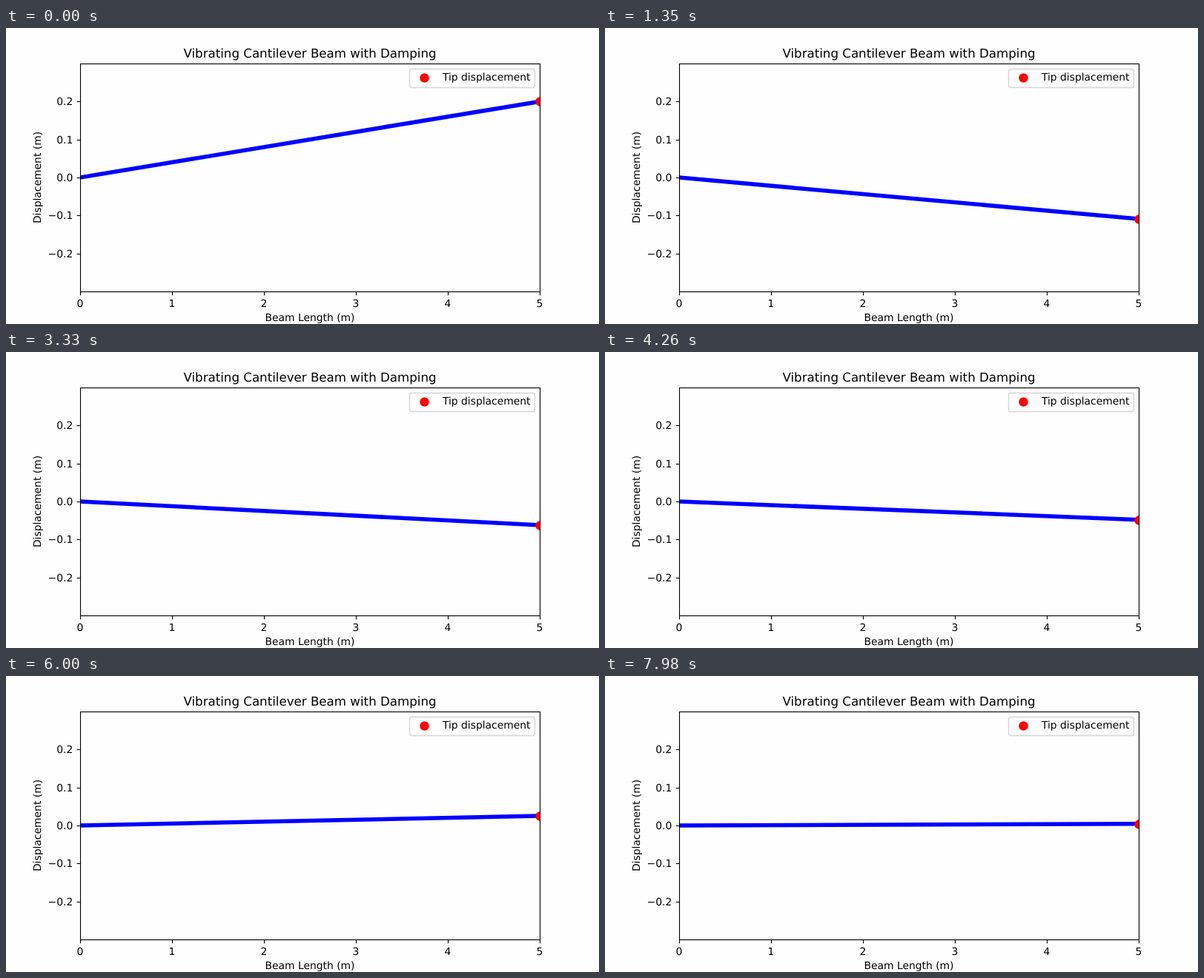
An HTML page that plays this animation: 800 by 400 pixels, repeating every 8000 ms.

```html
<!DOCTYPE html>
<html lang="en">
<head>
<meta charset="utf-8">
<title>Vibrating Cantilever Beam with Damping</title>
<style>
  html, body { margin: 0; width: 100%; height: 100%; overflow: hidden; background: #fefefe; }
  svg { display: block; width: 800px; height: 400px; }
  text {
    font: 13.889px "DejaVu Sans", sans-serif;
    text-rendering: geometricPrecision;
    text-anchor: middle;
  }
  .title { font-size: 16.667px; }
  .end { text-anchor: end; }
  .start { text-anchor: start; }
  .axis { fill: none; stroke: #000; stroke-width: 1.11; }
  .dot { fill: #f00; }
</style>
</head>
<body>
<svg viewBox="0 0 800 400">
  <clipPath id="plot"><rect x="100" y="48" width="620" height="308"/></clipPath>
  <g clip-path="url(#plot)">
    <line id="beam" x1="100" y1="202" x2="720" y2="99.33" stroke="#00f" stroke-width="5.556" stroke-linecap="square"/>
    <circle id="tip" class="dot" cx="720.5" cy="99.5" r="6.25"/>
  </g>
  <rect class="axis" x="100.5" y="48.5" width="620" height="308"/>
  <g id="ticks"></g>
  <text class="title" x="410" y="40">Vibrating Cantilever Beam with Damping</text>
  <text x="410" y="396">Beam Length (m)</text>
  <text transform="translate(47 202) rotate(-90)">Displacement (m)</text>
  <rect x="544.5" y="55.5" width="169" height="25" rx="2.78" fill="#fefefe" stroke="#ccc" stroke-opacity=".8" stroke-width="1.39"/>
  <circle class="dot" cx="564.5" cy="67.5" r="6.25"/>
  <text class="start" x="588.9" y="71">Tip displacement</text>
</svg>
<script>
  const LOOP = 8000, STEP = 30;
  const ZERO_Y = 202, SCALE = 308 / 0.6;
  const AMPLITUDE = 0.2, DECAY = 0.01, CYCLES = 0.3203; // decay and cycles per step

  const beam = document.getElementById('beam');
  const tip = document.getElementById('tip');
  const ticks = document.getElementById('ticks');

  const toY = value => ZERO_Y - value * SCALE;

  function add(name, attributes, content = '') {
    const node = document.createElementNS('http://www.w3.org/2000/svg', name);
    for (const key in attributes) node.setAttribute(key, attributes[key]);
    node.textContent = content;
    ticks.append(node);
  }

  for (let i = 0; i <= 5; i++) {
    const x = 100 + 124 * i;
    add('path', { class: 'axis', d: `M${x + 0.5} 356.5v4.86` });
    add('text', { x, y: 377 }, i);
  }
  for (let i = -2; i <= 2; i++) {
    const y = Math.round(toY(i / 10));
    add('path', { class: 'axis', d: `M100.5 ${y + 0.5}h-4.86` });
    add('text', { class: 'end', x: 90.3, y: y + 5 }, (i / 10).toFixed(1).replace('-', '\u2212'));
  }

  const start = performance.now();

  function draw() {
    const time = (performance.now() - start) % LOOP;
    const n = Math.floor(time / STEP);
    const y = toY(AMPLITUDE * Math.exp(-DECAY * n) * Math.cos(2 * Math.PI * CYCLES * n));
    beam.setAttribute('y2', y);
    tip.setAttribute('cy', Math.round(y) + 0.5);
    requestAnimationFrame(draw);
  }
  draw();
</script>
</body>
</html>
```
